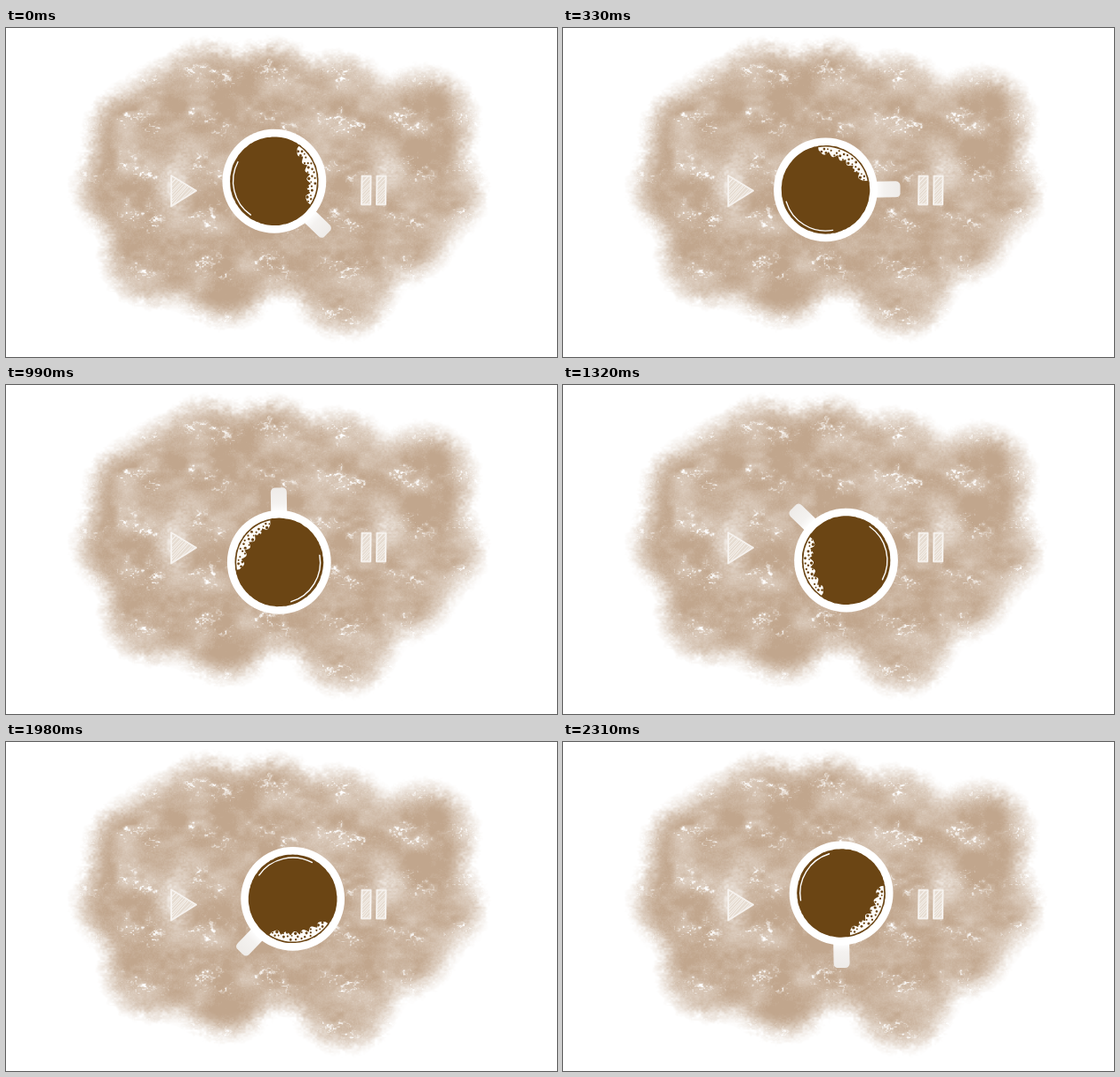
Recreate the animation shown at these times as an HTML page with a canvas. Size 620x370 px, loop 2.64 s.

```html
<!DOCTYPE html>
<html lang="en">
<head>
<meta charset="utf-8">
<title>Coffee loop</title>
<style>
html, body { margin: 0; width: 100%; height: 100%; overflow: hidden; background: #fff }
canvas { display: block }
</style>
</head>
<body>
<canvas id="stage" width="620" height="370"></canvas>
<script>
const W = 620, H = 370, STEP = 330, POSES = 8, BROWN = '#6b4514', RAD = Math.PI / 180;
const ctx = document.getElementById('stage').getContext('2d');

// Overlapping round dabs that form the stain: x, y, radius.
const dabs = [[310, 180, 115], [226, 74, 51], [300, 72, 50], [375, 87, 50], [468, 107, 54],
  [483, 185, 48], [445, 228, 51], [381, 288, 51], [246, 273, 54], [167, 253, 52],
  [132, 180, 48], [148, 122, 51], [182, 88, 42]];

const clamp = v => Math.max(0, Math.min(1, v));

function hash(x, y) {
  let h = Math.imul(x, 374761393) + Math.imul(y, 668265263);
  h = Math.imul(h ^ (h >>> 13), 1274126177);
  return ((h ^ (h >>> 16)) >>> 0) / 4294967296;
}

function noise(x, y) {
  const i = Math.floor(x), j = Math.floor(y);
  const ease = t => t * t * (3 - 2 * t), u = ease(x - i), v = ease(y - j);
  const top = hash(i, j) * (1 - u) + hash(i + 1, j) * u;
  const low = hash(i, j + 1) * (1 - u) + hash(i + 1, j + 1) * u;
  return top * (1 - v) + low * v;
}

// Closeness to the nearest worn patch of a lattice that starts at (x0, y0).
function patch(x, y, x0, y0) {
  const wrap = (v, size) => v - size * Math.round(v / size);
  return Math.exp(-((wrap(x - x0, 75) / 17) ** 2) - (wrap(y - y0, 54.5) / 9) ** 2);
}

function paintStain() {
  const c = document.createElement('canvas');
  c.width = W;
  c.height = H;
  const g = c.getContext('2d', { willReadFrequently: true });
  g.filter = 'blur(11px)';
  g.beginPath();
  for (const [x, y, r] of dabs) {
    g.moveTo(x + r, y);
    g.arc(x, y, r, 0, 7);
  }
  g.fill();
  g.filter = 'none';
  const img = g.getImageData(0, 0, W, H), d = img.data;
  for (let y = 0, k = 0; y < H; y++) for (let x = 0; x < W; x++, k += 4) {
    const m = d[k + 3] / 255;
    if (!m) continue;
    const cloud = noise(x / 27, y / 22), mid = noise(x / 8 + 90, y / 6);
    const fine = noise(x / 2.6, y / 2 + 40), grain = noise(x / 1.3 + 7, y / 1.3);
    const sx = x + 22 * (cloud - .5), sy = y + 14 * (mid - .5);
    const wear = Math.max(patch(sx, sy, 237, 58), patch(sx, sy, 290, 101));
    const edge = .45 * mid + .35 * fine + .2 * cloud;
    const fleck = clamp((.5 * fine + .3 * mid + .2 * grain + .22 * wear - .72) * 4);
    const light = clamp(.12 + .17 * wear + .42 * (cloud - .5) + .16 * (mid - .5) +
      .1 * (grain - .5)) + fleck * (.15 + .6 * wear);
    const tint = clamp(light);
    d[k] = 193 + 62 * tint;
    d[k + 1] = 166 + 89 * tint;
    d[k + 2] = 141 + 114 * tint;
    d[k + 3] = 255 * clamp(m * 1.12 - .08 + (edge - .5) * m * (1 - m) * 3);
  }
  g.putImageData(img, 0, 0);
  return g;
}

// Chalky button with diagonal hatching.
function chalk(g, x, ...pts) {
  g.save();
  g.beginPath();
  for (const [dx, y] of pts) g.lineTo(x + dx, y);
  g.closePath();
  g.lineJoin = 'round';
  g.fillStyle = '#e6dcd1';
  g.fill();
  g.strokeStyle = '#f6f2ee';
  g.lineWidth = 2;
  g.stroke();
  g.clip();
  g.beginPath();
  for (let i = 0; i < 22; i++) {
    g.moveTo(x - 34 + i * 3.2, 203);
    g.lineTo(x + i * 3.2 + 4 * hash(i, 3), 164);
  }
  g.lineWidth = 1;
  g.stroke();
  g.restore();
}

const back = paintStain();
chalk(back, 186, [0, 166], [28, 183], [0, 200.5]);
for (const x of [400, 417]) chalk(back, x, [.5, 166.5], [10.5, 166.5], [10, 198.5], [0, 198.5]);

// Cup parts, with the handle pointing along +x.
const handle = new Path2D('M52-9 L79-9.5 Q84-9 84-4 L84 5 Q83 8.5 79 8.5 L52 9Z');

function polar(path, r, deg) {
  path.lineTo(r * Math.cos(deg * RAD), r * Math.sin(deg * RAD));
}

const foam = new Path2D();
foam.arc(0, 0, 48.2, -12 * RAD, -100 * RAD, true);
for (let t = 0; t <= 1; t += .01)
  polar(foam, 41 + 4 * (2 * t - 1) ** 2 - 4.5 * Math.abs(Math.sin(6 * Math.PI * t)), 88 * t - 100);
foam.closePath();

const liquid = new Path2D();
for (let a = 0; a < 360; a += 3) polar(liquid, 49.6 + .4 * hash(a, 9), a);

const bubbles = [];
for (let i = 0; i < 900; i++) {
  const x = -8 + 56 * hash(i, 21), y = -48 + 42 * hash(i, 22), r = .8 + .9 * hash(i, 23);
  if (ctx.isPointInPath(foam, x, y) && Math.hypot(x, y) < 46.3 &&
      bubbles.every(b => Math.hypot(b[0] - x, b[1] - y) > b[2] + r + 1.3)) bubbles.push([x, y, r]);
}

const shade = ctx.createLinearGradient(56, 0, 84, 0);
shade.addColorStop(0, '#fff');
shade.addColorStop(.35, '#f4f2f0');
shade.addColorStop(1, '#eeebe8');

function disc(x, y, r) {
  ctx.beginPath();
  ctx.arc(x, y, r, 0, 7);
  ctx.fill();
}

// The cup swings anticlockwise about a pivot beside its centre.
function drawCup(pose) {
  ctx.save();
  ctx.translate(310.2, 184.7);
  ctx.rotate((45 - 45 * pose) * RAD);
  ctx.translate(-14.7, -2.9);
  ctx.fillStyle = shade;
  ctx.fill(handle);
  ctx.fillStyle = '#fff';
  disc(0, 0, 58.4);
  ctx.fillStyle = BROWN;
  ctx.fill(liquid);
  ctx.fillStyle = '#fffdf9';
  ctx.fill(foam);
  ctx.fillStyle = BROWN;
  for (const b of bubbles) disc(...b);
  ctx.beginPath();
  ctx.arc(0, 0, 46.3, 80 * RAD, 163 * RAD);
  ctx.strokeStyle = '#fff';
  ctx.lineWidth = 1.4;
  ctx.lineCap = 'round';
  ctx.stroke();
  ctx.restore();
}

function frame() {
  ctx.fillStyle = '#fff';
  ctx.fillRect(0, 0, W, H);
  ctx.drawImage(back.canvas, 0, 0);
  drawCup(Math.floor(performance.now() / STEP) % POSES);
  requestAnimationFrame(frame);
}
frame();
</script>
</body>
</html>
```
